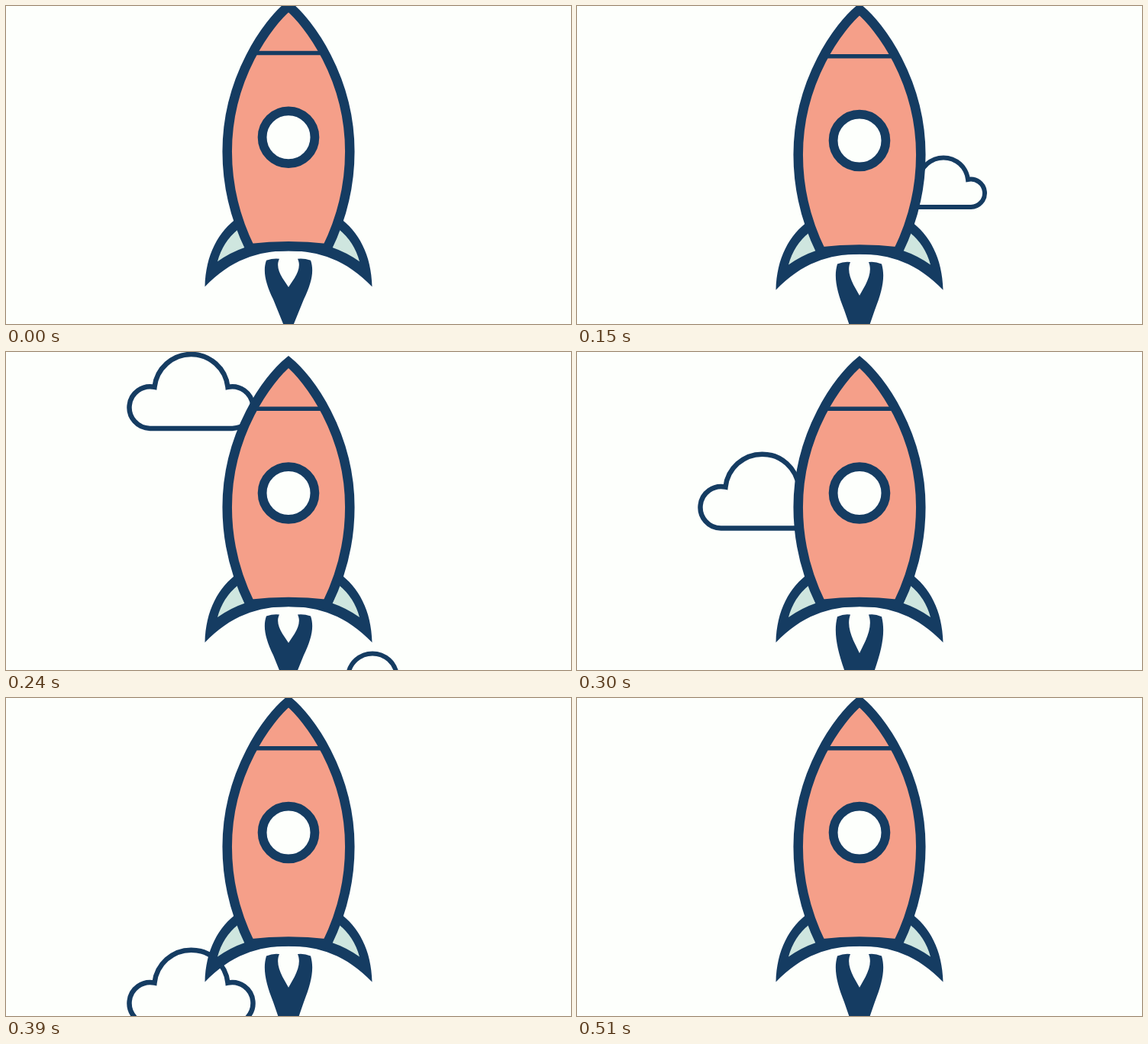
An HTML page for the animation above (0.54 s loop, 740 by 416 pixels).

```html
<!DOCTYPE html>
<html lang="en">
<head>
<meta charset="utf-8">
<title>Rocket</title>
<style>
  html, body { margin: 0; width: 100%; height: 100%; overflow: hidden; background: #fdfffc; }
  svg { display: block; width: 740px; height: 416px; }
  .line { stroke: #153c62; }
  .navy { fill: #153c62; }
  .paper { fill: #fdfffc; }
  .mint { fill: #cfe6df; }
  .coral { fill: #f59f89; }
</style>
</head>
<body>
<svg viewBox="0 0 740 416">
  <defs>
    <path id="cloud" class="paper line" vector-effect="non-scaling-stroke"
      d="M-36 67A18.2 18.2 0 1 1-32 31A32.2 32.2 0 0 1 32 31A18.2 18.2 0 1 1 36 67Z"/>
    <path id="fin" class="mint" d="M304 305Q284 321 277 347Q294 335 313 328.500Z"/>
  </defs>
  <g id="right"><use href="#cloud" stroke-width="6"/></g>
  <g id="left"><use href="#cloud" stroke-width="6.5"/></g>
  <g id="rocket">
    <path id="flame" class="navy"
      d="M341 2Q350-1 358 0C354 8 357 16 362 25L370 37L378 25C383 16 386 8 382 0Q390-1 399 2C404 16 400 32 390 53L377 85Q374 91 370 91Q366 91 363 85L350 53C340 32 336 16 341 2Z"/>
    <path class="navy"
      d="M260.500 380C261.500 338 278 308 304 289H436C462 308 478.500 338 479.500 380C446 345 410 333 370 333C330 333 294 345 260.500 380Z"/>
    <use href="#fin"/>
    <use href="#fin" transform="translate(740) scale(-1 1)"/>
    <path class="coral line" stroke-width="12.5" stroke-miterlimit="8"
      d="M370 13C344 34 289.700 106 289.700 203C289.700 250 302 294 319.700 330Q370 324 420.300 330C438 294 450.300 250 450.300 203C450.300 106 396 34 370 13Z"/>
    <path class="line" stroke-width="5.5" d="M324 74.300H416"/>
    <circle class="paper line" stroke-width="11.8" cx="370" cy="184.500" r="34.400"/>
  </g>
</svg>
<script>
  const LOOP = 540, STEP = 30, SPEED = 196 / 90;
  const el = id => document.getElementById(id);
  const wave = (t, period) => Math.cos(2 * Math.PI * t / period);
  const place = (id, value) => el(id).setAttribute('transform', value);

  function draw(now) {
    const t = Math.floor((now % LOOP) / STEP) * STEP;
    place('rocket', `translate(0 ${-4.25 - 8.5 * wave(t, 180)})`);
    place('flame', `translate(0 343.6) scale(1 ${1.18 - 0.18 * wave(t, 120)})`);
    place('right', `translate(480 ${(t - 60) * SPEED})`);
    place('left', `translate(242.5 ${(t - 240) * SPEED - 0.6}) scale(1.5)`);
  }

  const start = performance.now();
  function tick() {
    draw(performance.now() - start);
    requestAnimationFrame(tick);
  }
  tick();
</script>
</body>
</html>
```
